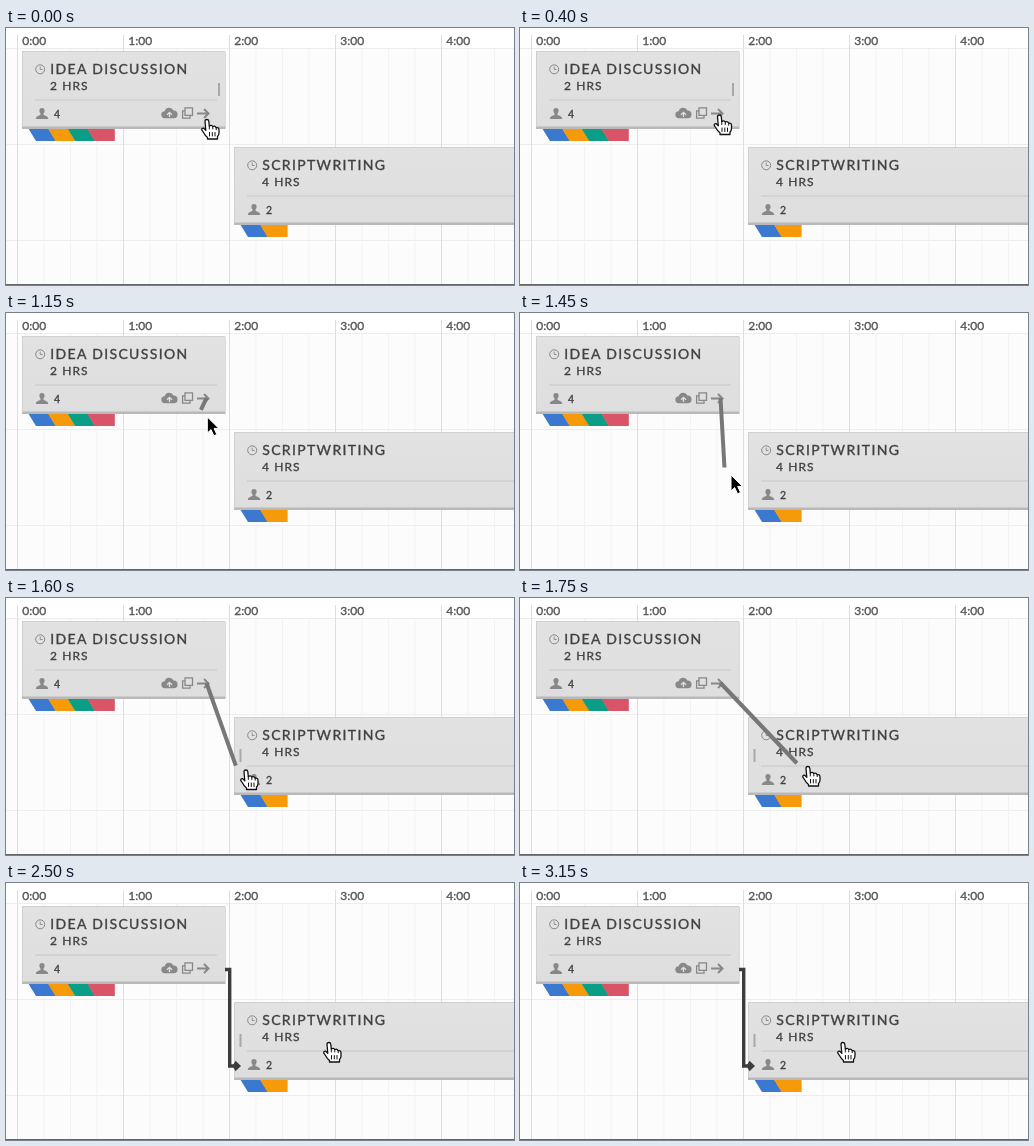
Animation of 508x257 px, one loop 3200 ms. Source, as an HTML page:

```html
<!DOCTYPE html>
<html lang="en">
<head>
<meta charset="utf-8">
<title>Linking tasks on a timeline</title>
<style>
  html, body { margin: 0; width: 100%; height: 100%; overflow: hidden; background: #fcfcfc; }
  svg { display: block; font-family: Lato, sans-serif; }
  text { fill: #414141; stroke: #414141; stroke-width: .35px; }
  .title { font-size: 14px; letter-spacing: 1.35px; }
  .hours { font-size: 12px; letter-spacing: 1.1px; }
  .count { font-size: 10.5px; }
  .scale { font-size: 12px; fill: #555; stroke: #555; }
  .icon { fill: #888; }
  .line { fill: none; stroke: #888; }
</style>
</head>
<body>
<svg id="stage" width="508" height="257" viewBox="0 0 508 257"></svg>
<script>
const LOOP = 3200, STEP = 50;
const PRESS = 950, RELEASE = 2500;
const HOUR = 106, LEFT = 11.5;
const COLORS = ['#3b78d0', '#f79a09', '#0a9e86', '#da5468'];
const cards = [
  { x: 16, y: 23, w: 203, h: 76, title: 'IDEA DISCUSSION', hours: 2, people: 4, grip: 197, tools: true },
  { x: 228, y: 119, w: 290, h: 76, title: 'SCRIPTWRITING', hours: 4, people: 2, grip: 6.5 }
];
// Pointer path: time, x, y
const route = [
  [100, 201, 92], [500, 199, 86], [PRESS, 199, 86], [1100, 200, 95], [1250, 204, 122],
  [1450, 211, 162], [1550, 226, 171], [1650, 254, 174], [1750, 288, 169],
  [1850, 311, 163], [1950, 323, 160]
];

function grid() {
  let out = '<rect width="508" height="20" fill="#fff"/>';
  for (const y of [20.5, 116.5, 212.5]) out += `<path d="M0 ${y}H508" stroke="#ededed"/>`;
  for (let i = 0; i < 19; i++) {
    const x = LEFT + i * HOUR / 4, major = i % 4 === 0;
    out += `<path d="M${x} ${major ? 7 : 21}V256" stroke="${major ? '#dedede' : '#f3f3f3'}"/>`;
    if (major) out += `<text class="scale" x="${x + 4.8}" y="17">${i / 4}:00</text>`;
  }
  return out + '<path d="M0 256.5H508" stroke="#666"/>';
}

function tags(count) {
  let out = '';
  for (let i = 0; i < count; i++) {
    const x = 6 + 19.6 * i;
    const shape = i < count - 1 ? 'h20l8 13h-20z' : 'h28v13h-20z';
    out += `<path d="M${x} 77${shape}" fill="${COLORS[i]}"/>`;
  }
  return out;
}

const tools = `
  <path class="icon" d="M143 67.200a3.500 3.500 0 0 1-.3-7 4.700 4.500 0 0 1 8.800-.8 3.900 3.900 0 0 1 .3 7.800z"/>
  <path d="M147.500 66v-4.500m-2.500 2.300 2.500-2.500 2.500 2.500" fill="none" stroke="#e0e0e0" stroke-width="1.300"/>
  <path class="line" stroke-width="1.300" d="M163 56.800h7.500v7.500h-7.500zM163 59.800h-2.400v7.400h7.400v-2.800"/>
  <path class="line" stroke-width="2" d="M175 62.500h11.500m-4.500-4.500 4.500 4.500-4.500 4.500"/>`;

function card(c) {
  return `<g transform="translate(${c.x} ${c.y})">
    ${tags(c.people)}
    <rect y="1" width="${c.w + .5}" height="${c.h + 1}" fill="#b9b9b9"/>
    <rect width="${c.w}" height="${c.h - .5}" fill="url(#paper)"/>
    <path d="M0 .5H${c.w}M.5 0V${c.h - 1}" stroke="#d0d0d0"/>
    <path d="M13 49H${c.w - 8}" stroke="#c6c6c6"/>
    <circle class="line" cx="18.2" cy="18.3" r="4.5"/>
    <path class="line" d="M18.2 15.5v3h2.4" stroke-width=".9"/>
    <text class="title" x="28.2" y="23.2">${c.title}</text>
    <text class="hours" x="28" y="39.2">${c.hours} HRS</text>
    <path class="icon" transform="translate(2 6.800) scale(.9)" d="M13 68q0-3 3-3.700l2.300-.8v-1.600q-1.200-1.400-1.200-3 0-3.100 2.900-3.100t2.900 3.100q0 1.600-1.200 3v1.600l2.300.8q3 .7 3 3.700z"/>
    <text class="count" x="32" y="66.6">${c.people}</text>
    ${c.tools ? tools : ''}
    <path class="grip" d="M${c.grip} 32v13" stroke="#a8a8a8" stroke-width="2"/>
  </g>`;
}

const stage = document.getElementById('stage');
stage.innerHTML = `
  <linearGradient id="paper" x2="0" y2="1">
    <stop stop-color="#e2e2e2"/><stop offset="1" stop-color="#dedede"/>
  </linearGradient>
  ${grid()}${cards.map(card).join('')}
  <path id="drag" fill="none" stroke="#777" stroke-width="4"/>
  <g id="link">
    <path d="M219 86.5H223.7V183H230" fill="none" stroke="#3c3c3c" stroke-width="3.4"/>
    <path d="M229.5 177.8 235 183l-5.5 5.2-2-3.5v-3.4z" fill="#3c3c3c"/>
  </g>
  <g id="pointer">
    <path id="arrow" d="M0 0V16l3.7-3.4 2.8 6.2 3-1.3-2.8-6.1H11.5z" fill="#000" stroke="#fff"/>
    <g id="hand" transform="translate(0 -1)" stroke="#111" stroke-width="1.3" stroke-linejoin="round" stroke-linecap="round">
      <path fill="#fff" d="M-2 2.3Q-2 .5-.2 .5T1.8 2.3L2.3 7Q4.5 5.5 5.8 7.5 8.2 6.500 9.200 8.700 12 8 12 11V14Q12 16 10.500 17.500V20H.5V18.500Q-2 16.500-3.500 13.500L-5.300 10.800Q-5.300 8.800-3.300 9.200L-1.200 11.200z"/>
      <path fill="none" stroke-width="1" d="M2.3 7v3M5.8 7.5v2.5M9.2 8.7v2M2.5 13.5v3.5M5.3 13.5v3.5M8 13.5v3.5"/>
    </g>
  </g>`;

const [drag, link, pointer, arrow, hand] =
  ['drag', 'link', 'pointer', 'arrow', 'hand'].map(id => document.getElementById(id));
const grips = document.querySelectorAll('.grip');

const show = (node, on) => node.setAttribute('visibility', on ? 'visible' : 'hidden');

function position(t) {
  const next = route.findIndex(p => p[0] > t);
  if (next === 0) return route[0].slice(1);
  if (next < 0) return route[route.length - 1].slice(1);
  const [t0, x0, y0] = route[next - 1], [t1, x1, y1] = route[next];
  const k = (t - t0) / (t1 - t0);
  return [x0 + (x1 - x0) * k, y0 + (y1 - y0) * k];
}

function draw(t) {
  const [x, y] = position(t);
  const over = cards.map(c => x >= c.x && x < c.x + c.w && y >= c.y && y < c.y + c.h);
  const hovering = over.includes(true);
  grips.forEach((grip, i) => show(grip, over[i]));
  show(hand, hovering);
  show(arrow, !hovering);
  pointer.setAttribute('transform', `translate(${x} ${y})`);

  // The loose end trails slightly behind the pointer.
  const [ex, ey] = position(t - 15);
  drag.setAttribute('d', `M200.5 85L${ex - 6} ${ey - 4.5}`);
  show(drag, t >= PRESS && t < RELEASE);
  show(link, t >= RELEASE);
}

function tick() {
  draw(Math.floor(performance.now() % LOOP / STEP) * STEP);
  requestAnimationFrame(tick);
}
tick();
</script>
</body>
</html>
```
